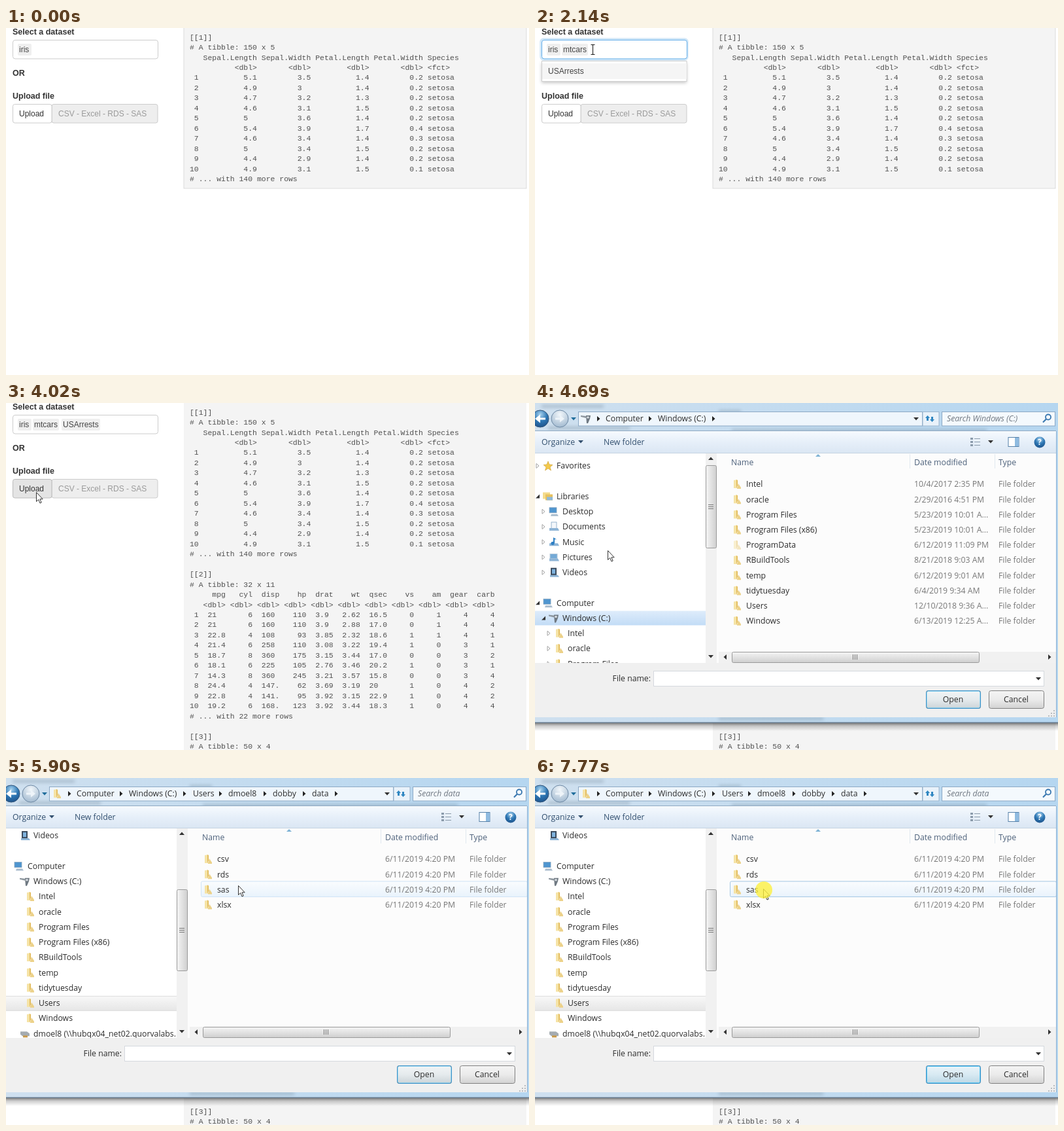
An HTML page for the animation above (8 s loop, 800 by 530 pixels).

```html
<!DOCTYPE html>
<html lang="en">
<head>
<meta charset="utf-8">
<title>Dataset picker</title>
<style>
html, body { margin: 0; width: 100%; height: 100%; overflow: hidden; background: #fff; }
svg { display: block; width: 800px; height: 530px; }
text { white-space: pre; }
.page { font: 12px "Liberation Sans", Arial, sans-serif; fill: #444; }
.page .label { font-size: 12.5px; font-weight: bold; fill: #333; }
.mono { font: 11.45px "Liberation Mono", monospace; fill: #505050; }
.dialog { font: 12.25px "Open Sans", "Noto Sans", sans-serif; fill: #2c2c2c; }
</style>
</head>
<body>
<svg viewBox="0 0 800 530">
  <defs>
    <linearGradient id="glass"><stop stop-color="#cfe0ef"/><stop offset="1" stop-color="#b5d6f0"/></linearGradient>
    <linearGradient id="bar" x2="0" y2="1"><stop stop-color="#f6fafe"/><stop offset=".5" stop-color="#e6eff9"/><stop offset="1" stop-color="#dae6f3"/></linearGradient>
    <linearGradient id="blue" x2="0" y2="1"><stop stop-color="#deecfb"/><stop offset="1" stop-color="#c2dcf6"/></linearGradient>
    <linearGradient id="grey" x2="0" y2="1"><stop stop-color="#f8f8f8"/><stop offset="1" stop-color="#e6e6e6"/></linearGradient>
    <linearGradient id="hover" x2="0" y2="1"><stop stop-color="#fafcfe"/><stop offset="1" stop-color="#e9f3fc"/></linearGradient>
    <linearGradient id="button" x2="0" y2="1"><stop stop-color="#f4f4f4"/><stop offset=".5" stop-color="#ebebeb"/><stop offset="1" stop-color="#d2d2d2"/></linearGradient>
    <linearGradient id="glow" x2="0" y2="1"><stop stop-color="#e2f4fd"/><stop offset="1" stop-color="#a6dcf7"/></linearGradient>
    <linearGradient id="thumbX" x2="0" y2="1"><stop stop-color="#f5f5f5"/><stop offset="1" stop-color="#cfcfcf"/></linearGradient>
    <linearGradient id="thumbY"><stop stop-color="#f5f5f5"/><stop offset="1" stop-color="#cfcfcf"/></linearGradient>
    <linearGradient id="shade" x2="0" y2="1"><stop stop-color="#000" stop-opacity=".55"/><stop offset=".4" stop-color="#000" stop-opacity=".2"/><stop offset="1" stop-color="#000" stop-opacity="0"/></linearGradient>
    <radialGradient id="ball" cy=".25" r=".8"><stop stop-color="#a9d3ef"/><stop offset=".5" stop-color="#2f78b5"/><stop offset="1" stop-color="#1c4f86"/></radialGradient>
    <radialGradient id="paleBall" cy=".25" r=".8"><stop stop-color="#f2f7fb"/><stop offset="1" stop-color="#9db6cd"/></radialGradient>
    <filter id="soft" x="-20%" y="-100%" width="140%" height="300%"><feGaussianBlur stdDeviation="2.4"/></filter>
    <clipPath id="treeClip"><rect y="77" width="261" height="320"/></clipPath>
  </defs>
  <g id="stage"></g>
</svg>
<script>
const LOOP = 8000;

const iris = `[[1]]
# A tibble: 150 x 5
   Sepal.Length Sepal.Width Petal.Length Petal.Width Species
          <dbl>       <dbl>        <dbl>       <dbl> <fct>
 1          5.1         3.5          1.4         0.2 setosa
 2          4.9         3            1.4         0.2 setosa
 3          4.7         3.2          1.3         0.2 setosa
 4          4.6         3.1          1.5         0.2 setosa
 5          5           3.6          1.4         0.2 setosa
 6          5.4         3.9          1.7         0.4 setosa
 7          4.6         3.4          1.4         0.3 setosa
 8          5           3.4          1.5         0.2 setosa
 9          4.4         2.9          1.4         0.2 setosa
10          4.9         3.1          1.5         0.1 setosa
# ... with 140 more rows`;

const others = `[[2]]
# A tibble: 32 x 11
     mpg   cyl  disp    hp  drat    wt  qsec    vs    am  gear  carb
   <dbl> <dbl> <dbl> <dbl> <dbl> <dbl> <dbl> <dbl> <dbl> <dbl> <dbl>
 1  21       6  160    110  3.9   2.62  16.5     0     1     4     4
 2  21       6  160    110  3.9   2.88  17.0     0     1     4     4
 3  22.8     4  108     93  3.85  2.32  18.6     1     1     4     1
 4  21.4     6  258    110  3.08  3.22  19.4     1     0     3     1
 5  18.7     8  360    175  3.15  3.44  17.0     0     0     3     2
 6  18.1     6  225    105  2.76  3.46  20.2     1     0     3     1
 7  14.3     8  360    245  3.21  3.57  15.8     0     0     3     4
 8  24.4     4  147.    62  3.69  3.19  20       1     0     4     2
 9  22.8     4  141.    95  3.92  3.15  22.9     1     0     4     2
10  19.2     6  168.   123  3.92  3.44  18.3     1     0     4     4
# ... with 22 more rows

[[3]]
# A tibble: 50 x 4`;

const drive = ['Intel', 'oracle', 'Program Files', 'Program Files (x86)', 'ProgramData',
  'RBuildTools', 'temp', 'tidytuesday', 'Users', 'Windows'];
const driveDates = ['10/4/2017 2:35 PM', '2/29/2016 4:51 PM', '5/23/2019 10:01 A...', '5/23/2019 10:01 A...',
  '6/12/2019 11:09 PM', '8/21/2018 9:03 AM', '6/12/2019 9:01 AM', '6/4/2019 9:34 AM',
  '12/10/2018 9:36 A...', '6/13/2019 12:25 A...'];

// label, text x, icon, expander state
const tree = [
  ['Favorites', 33, 'star', 'closed'], null,
  ['Libraries', 33, 'library', 'open'],
  ...['Desktop', 'Documents', 'Music', 'Pictures', 'Videos'].map(s => [s, 42, s, 'closed']), null,
  ['Computer', 33, 'screen', 'open'],
  ['Windows (C:)', 42, 'disk', 'open'],
  ...drive.filter(s => s !== 'ProgramData').map(s => [s, 50, 'folder', 'closed']),
  ['dmoel8 (\\\\hubqx04_net02.quorvalabs.', 42, 'share', 'closed'],
];

// Each step changes only the listed parts of the state.
const steps = [
  { at: 0, tags: 1 },
  { at: 280, beam: [299, 188] },
  { at: 900, beam: [88, 14] },
  { at: 1210, beam: [83, 26] },
  { at: 1840, beam: [85, 25], focus: true, menu: ['mtcars', 'USArrests'] },
  { at: 2140, tags: 2, menu: ['USArrests'] },
  { at: 2770, tags: 3, menu: null, caret: true },
  { at: 3070, caret: false, beam: null, arrow: [120, 191] },
  { at: 3700, caret: true, arrow: [44, 138], hover: true },
  { at: 4020, caret: false, focus: false, arrow: [46, 136] },
  { at: 4690, dialog: 'drive', arrow: [111, 225], glow: .3 },
  { at: 5580, arrow: [350, 307], row: 8, click: true, glow: .8 },
  { at: 5900, dialog: 'data', arrow: [355, 164], row: 2, click: false, glow: .3 },
  { at: 6200, arrow: [352, 143], row: 1 },
  { at: 6850, arrow: [350, 172], row: 2, glow: .6 },
  { at: 7150, arrow: [349, 169], glow: .3 },
  { at: 7770, click: true, glow: 1 },
];
const states = [];
steps.reduce((prev, step) => (states.push({ ...prev, ...step }), states.at(-1)), {});

const esc = s => s.replace(/&/g, '&amp;').replace(/</g, '&lt;');
const rect = (x, y, w, h, fill, more = '') =>
  `<rect x="${x}" y="${y}" width="${w}" height="${h}" fill="${fill}" ${more}/>`;
const path = (d, fill, more = '') => `<path d="${d}" fill="${fill}" ${more}/>`;
const circle = (x, y, r, fill, more = '') => `<circle cx="${x}" cy="${y}" r="${r}" fill="${fill}" ${more}/>`;
const text = (x, y, s, more = '') => `<text x="${x}" y="${y + 4.3}" ${more}>${esc(s)}</text>`;
const at = (x, y, body, more = '') => `<g transform="translate(${x} ${y})" ${more}>${body}</g>`;
const down = (x, y, fill = '#333') => path(`M${x - 4} ${y - 2}h8l-4 4.5z`, fill);
const right = (x, y, fill = '#222') => path(`M${x - 2} ${y - 4}v8l4.5-4z`, fill);

const output = (s, firstLine) => s.split('\n')
  .map((line, i) => text(281, 14 + 15.47 * (firstLine + i) - .7, line, 'class="mono"')).join('');

function pageView({ tags, focus, menu, caret, hover }) {
  const names = [['iris', 20, 21], ['mtcars', 43, 40], ['USArrests', 87, 59]].slice(0, tags);
  let s = text(10, 5.5, 'Select a dataset', 'class="label"') + text(10, 69, 'OR', 'class="label"')
    + text(10, 103.5, 'Upload file', 'class="label"');
  if (focus) s += rect(9, 17, 224, 31, 'none', 'rx="4" stroke="#66afe9" stroke-width="3.5" opacity=".3"');
  s += rect(10.5, 18.5, 222, 28.5, '#fff', `rx="3.5" stroke="${focus ? '#66afe9' : '#ccc'}"`);
  for (const [name, x, w] of names) s += rect(x - 2, 24, w, 18, '#efefef', 'rx="2"') + text(x, 33, name);
  if (caret) s += rect(148, 26, 1, 15, '#555');
  s += rect(70, 116.5, 162, 28.5, '#eee', 'stroke="#ccc" rx="3"')
    + rect(10.5, 116.5, 59.5, 28.5, hover ? '#e4e4e4' : '#fff', `stroke="${hover ? '#bbb' : '#ccc'}" rx="3"`)
    + text(20, 131, 'Upload', 'style="fill:#333"') + text(80, 131, 'CSV - Excel - RDS - SAS', 'style="fill:#9a9a9a"');
  if (menu) {
    const h = 7 + 24 * menu.length;
    s += rect(10, 53, 222, h, '#000', 'opacity=".22" filter="url(#soft)"')
      + rect(10.5, 50.5, 221.5, h, '#fff', 'stroke="#d0d0d0"') + rect(11, 54, 221, 24, '#f5f5f5')
      + menu.map((name, i) => text(20, 66 + 24 * i, name)).join('');
  }
  s += rect(272, -5, 524, tags < 3 ? 250 : 540, '#f4f4f4', tags < 3 ? 'stroke="#d4d4d4" stroke-width=".8"' : '')
    + output(iris, 0);
  if (tags === 3) s += output(others, 16);
  return `<g class="page">${s}</g>`;
}

const screenIcon = rect(-7, -6, 11, 8, '#4f95cf', 'stroke="#8ba7bf" stroke-width=".8"') + path('M-4 4h9l2 3h-12z', '#a9bccd');
const icons = {
  folder: path('M-5-6l5-1v13l-5 0z', '#f5e3a6') + path('M-1-7l2 1v8l-2 4z', '#e3bd60') + path('M0 6l2-7 4 6v2l-6 0z', '#ecd188'),
  star: path('M0-7l2 5 5 .5-4 3.500 1.500 5-4.500-3-4.500 3 1.500-5-4-3.500 5-.5z', '#f3c94c', 'stroke="#c99a2c" stroke-width=".6"'),
  library: rect(-8, -6, 11, 10, '#f4dc8d') + rect(-4, -3, 11, 9, '#e7c15e') + rect(-2, 1, 9, 5, '#8fb9d9'),
  screen: screenIcon,
  Desktop: screenIcon,
  Documents: rect(-4, -7, 8, 10, '#f3f7fb', 'stroke="#7fa3c4" stroke-width=".8"') + path('M-7 2h13l2 4h-15z', '#8db4d6'),
  Music: path('M-1-7l5 3-3 0v6l-2 0z', '#2d7fc4') + path('M-7 2h13l2 4h-15z', '#8db4d6') + circle(-2, 2, 2.6, '#2d7fc4'),
  Pictures: rect(-6, -5, 11, 7, '#73aad6', 'stroke="#b5c9da"') + path('M-7 2h13l2 4h-15z', '#8db4d6'),
  Videos: rect(-5, -7, 9, 12, '#3c4c5e') + rect(-3, -5, 5, 7, '#7eb2dd') + path('M-6 4h12l2 3h-14z', '#8db4d6'),
  disk: path('M-8-5l8 1 0 3-8-2z', '#8d969e') + path('M0-5h7l-1 5-3 7h-2z', '#6f7982') + circle(3, -2, 1.8, '#d9dee3'),
  share: path('M-7-3h10l4 3v4h-11l-3-3z', '#a4abb1') + rect(-3, 3, 7, 3, '#c99a4a'),
};

function treeView(inData, listFocused) {
  const scroll = inData ? 170.7 : 0;
  const selected = inData ? 'Users' : 'Windows (C:)';
  const rows = tree.map((item, i) => {
    const y = 96 + 23.25 * i - scroll;
    if (!item || y < 70 || y > 410) return '';
    const [name, x, icon, expander] = item;
    let s = '';
    if (name === selected) s += listFocused
      ? rect(-1, y - 10.5, 263, 22, 'url(#grey)', 'stroke="#dcdcdc"') : rect(0, y - 11, 261, 22, 'url(#blue)');
    if (!inData) s += expander === 'open' ? path(`M${x - 32} ${y + 3}h6v-6z`, '#333')
      : path(`M${x - 31} ${y - 3.5}v7l4-3.500z`, '#fff', 'stroke="#a0a0a0"');
    return s + at(x - 13, y, icons[icon]) + text(x, y, name);
  }).join('');
  const top = inData ? 170 : 95, size = inData ? 124 : 126;
  let bar = rect(261, 77, 17, 320, '#f1f1f1') + path('M265 87l4-4.500 4 4.500z', '#333') + down(269, 387)
    + rect(261.5, top + .5, 16, size, 'url(#thumbY)', 'rx="2" stroke="#9a9a9a"');
  for (let k = -1; k < 2; k++) bar += rect(265, top + size / 2 + 3 * k, 8, 1, '#777');
  return `<g clip-path="url(#treeClip)">${rect(0, 77, 261, 320, '#fff')}${rows}</g>${bar}`;
}

function listView(inData, row, click) {
  const names = inData ? ['csv', 'rds', 'sas', 'xlsx'] : drive;
  let s = rect(278, 77, 519, 320, '#fcfcfc')
    + [[300, 'Name'], [580, 'Date modified'], [709, 'Type']].map(([x, t]) => text(x, 91, t, 'fill="#4c607a"')).join('')
    + rect(573, 78, 1, 22, '#e0e8f0') + rect(703, 78, 1, 22, '#e0e8f0') + path('M429 82l4-4 4 4z', '#7fb3d5');
  names.forEach((name, i) => {
    const y = 124 + 23.2 * i;
    if (i === row) s += rect(298.5, y - 12.5, 499, 23.5, 'url(#hover)',
      `rx="2" stroke="${click ? '#a3c6e3' : '#cfe4f6'}"`);
    s += at(309, y, icons.folder, name === 'ProgramData' ? 'opacity=".5"' : '') + text(323, y, name)
      + text(580, y, inData ? '6/11/2019 4:20 PM' : driveDates[i], 'fill="#777"') + text(709, y, 'File folder', 'fill="#777"');
  });
  s += rect(281, 380, 516, 17, '#f1f1f1') + path('M293 384v8l-4.500-4z', '#333') + right(787, 388, '#333')
    + rect(301.5, 380.5, 378, 16, 'url(#thumbX)', 'rx="2" stroke="#9a9a9a"');
  for (let k = -1; k < 2; k++) s += rect(489 + 3 * k, 384, 1, 8, '#777');
  return s;
}

function addressBar(inData) {
  const crumbs = [['Computer', 108, 176], ['Windows (C:)', 188, 273]];
  if (inData) crumbs.push(['Users', 286, 328], ['dmoel8', 340, 396], ['dobby', 408, 456], ['data', 468, 505]);
  const ghosts = [[10, 3, 95], [20, 36, 125], [281, 11, 34], [301, 40, 390], [281, 480, 160]];
  return rect(0, 0, 800, 489, 'url(#glass)')
    + `<g filter="url(#soft)" opacity=".3">${ghosts.map(([x, y, w]) => rect(x, y, w, 4, '#4f6375')).join('')}</g>`
    + circle(38, 24, 13, 'url(#paleBall)', 'stroke="#6f8aa5"') + path('M31 22.500h7v-4l7 5.500-7 5.500v-4h-7z', '#eef4f9')
    + circle(8, 24, 13, 'url(#ball)', 'stroke="#35577b"') + path('M16 22.500h-8v-5l-8 6.500 8 6.500v-5h8z', '#fff')
    + down(59, 24, '#1f6d9c')
    + rect(66.5, 13.5, 526, 21.5, '#eff6fc', 'stroke="#8ca9c5"') + rect(593, 13.5, 25, 21.5, '#e9f2fa', 'stroke="#9bb5ce"')
    + rect(622.5, 13.5, 173, 21.5, '#f4f9fd', 'stroke="#8ca9c5"')
    + at(78, 24, icons[inData ? 'folder' : 'disk']) + right(97, 24)
    + crumbs.map(([name, x, arrow]) => text(x, 24, name) + right(arrow, 24)).join('') + down(583, 24)
    + path('M597 23l3.500-4 3.500 4h-2v4h-3v-4zM604 25h2v-4h3v4h2l-3.500 4z', '#2f86c1')
    + text(630, 24, inData ? 'Search data' : 'Search Windows (C:)', 'font-style="italic" fill="#6f7780"')
    + circle(785, 21.5, 4, 'none', 'stroke="#3a78b0" stroke-width="1.8"') + path('M782 24.500l-5 5', 'none', 'stroke="#3a78b0" stroke-width="2.2"');
}

const toolbar = rect(0, 43, 797, 34, 'url(#bar)') + rect(0, 42, 797, 1, '#8fa9c2') + rect(0, 76, 797, 1, '#c5d3e2')
  + text(10, 60, 'Organize', 'fill="#33506f"') + down(70, 59, '#33506f') + text(105, 60, 'New folder', 'fill="#33506f"')
  + [53, 58, 63].map(y => rect(666, y, 4, 3, '#8b9bab') + rect(672, y + 1, 9, 1, '#8b9bab')).join('') + down(697, 59)
  + rect(724, 52.5, 16, 14, '#fff', 'stroke="#5580a8"') + rect(734, 53, 6, 13, '#8fbbe0')
  + circle(772, 60, 8.5, 'url(#ball)') + text(772, 60, '?', 'text-anchor="middle" font-weight="bold" style="fill:#fff"');

function footer(glow) {
  const button = (x, w, label, lit) => rect(x + .5, 439.5, w, 27, 'url(#button)', 'rx="3" stroke="#808080"')
    + (lit ? rect(x + .5, 439.5, w, 27, 'url(#glow)', `rx="3" opacity="${lit * .5}"`)
      + rect(x + .5, 439.5, w, 27, 'none', 'rx="3" stroke="#3c8fc6"')
      + rect(x + 1.5, 440.5, w - 2, 25, 'none', `rx="2" stroke="#52c6f2" opacity="${.3 + lit * .6}"`) : '')
    + text(x + w / 2, 453, label, 'text-anchor="middle"');
  return rect(0, 397, 797, 83, '#f0f0f0') + text(177, 421, 'File name:', 'text-anchor="end"')
    + rect(181.5, 409.5, 597, 23, '#fff', 'stroke="#d5d9de"') + down(770, 421)
    + button(598, 83, 'Open', glow) + button(694, 84, 'Cancel')
    + [[793, 471], [789, 475], [793, 475], [785, 479], [789, 479], [793, 479]].map(([x, y]) => rect(x, y - 2, 2, 2, '#b8bcc0')).join('');
}

function dialogView({ dialog, row, click, glow }) {
  const inData = dialog === 'data';
  return `<g class="dialog">${rect(0, 488, 800, 13, 'url(#shade)')}${addressBar(inData)}${toolbar}`
    + treeView(inData, row !== undefined) + listView(inData, row, click) + footer(glow)
    + rect(797, 43, 1, 437, '#8fb2d2') + rect(0, 487.5, 800, 1.5, '#66798b') + '</g>';
}

function pointer({ beam, arrow, click }) {
  let s = '';
  if (beam) s += at(...beam, path('M.5 .5h2.500l.5 1 .5-1h2.500M3.500 1v14M.5 15.500h2.500l.5-1 .5 1h2.500', 'none', 'stroke="#222" stroke-width="1.1"'));
  if (arrow) s += at(...arrow, path('M.5 .5v14l3.200-3 2.300 5.500 2.200-1-2.300-5.200h4.300z', '#fff', 'stroke="#333"'));
  if (click) s += circle(arrow[0] + 1, arrow[1] + 2, 13, '#fdf03c', 'opacity=".78"');
  return s;
}

const stage = document.getElementById('stage');
let shown;
function tick() {
  const time = performance.now() % LOOP;
  const state = states.findLast(s => s.at <= time);
  if (state !== shown) {
    shown = state;
    stage.innerHTML = pageView(state) + (state.dialog ? dialogView(state) : '') + pointer(state);
  }
  requestAnimationFrame(tick);
}
tick();
</script>
</body>
</html>
```
